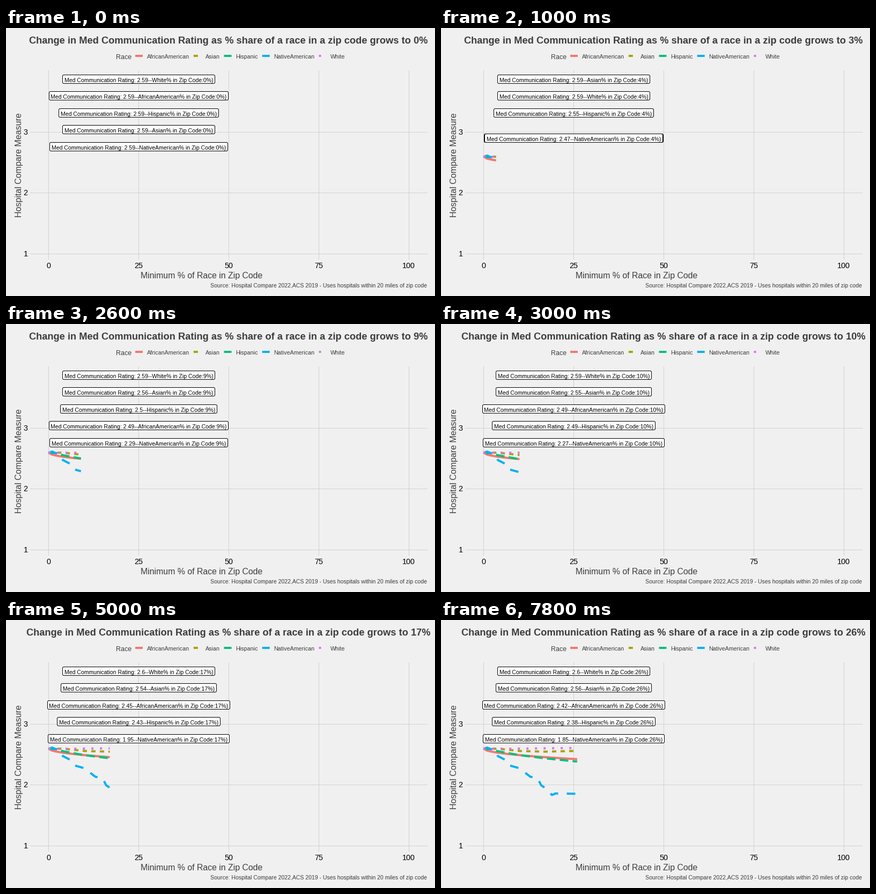
Animation of 800 by 500 pixels, one loop 8 s. Source, as a matplotlib script:

```python
import numpy as np
import matplotlib.pyplot as plt
from matplotlib.animation import FuncAnimation
from matplotlib.patches import FancyBboxPatch

W, H, DPI = 800, 500, 100
FRAMES, STEP_MS = 40, 200
FRAMES_PER_PCT = 1.49
MID_X = 247.5
BG, GRID, INK = "#F0F0F0", "#D2D2D2", "#3C3C3C"

plt.rcParams["font.family"] = "Liberation Sans"


def through(*points):
    """Curve of straight pieces through (percent, rating) points."""
    return lambda pct: np.interp(pct, *zip(*points))


def african_american(pct):
    return 2.5948 - 0.0344 * np.sqrt(pct)


asian = through((0, 2.591), (4, 2.592), (10, 2.554), (17, 2.543), (26, 2.556))
hispanic = through((0, 2.593), (2, 2.585), (4, 2.55), (10, 2.4855),
                   (17, 2.434), (26, 2.38))
native_american = through((0, 2.59), (1, 2.61), (3, 2.56), (4, 2.47), (6, 2.41),
                          (7, 2.32), (10, 2.27), (13, 2.13), (15, 2.11),
                          (16, 1.99), (17, 1.95), (19, 1.83), (20, 1.855),
                          (26, 1.85))
white = through((0, 2.5949), (4, 2.59), (12, 2.5945), (26, 2.604))

RACES = [
    ("AfricanAmerican", "#F8766D", "-", african_american),
    ("Asian", "#A3A500", (0, (2, 2)), asian),
    ("Hispanic", "#00BF7D", (0, (4, 2)), hispanic),
    ("NativeAmerican", "#00B0F6", (0, (4, 4)), native_american),
    ("White", "#E76BF3", (0, (1, 3)), white),
]

PCT = np.arange(27)
PCT_FRAME = np.round(PCT * FRAMES_PER_PCT)
RATING = np.array([rate(PCT) for *_, rate in RACES])
# rank of every race at every percent, 0 = highest rating
RANK = np.argsort(np.argsort(-RATING, axis=0), axis=0)

fig = plt.figure(figsize=(W / DPI, H / DPI), dpi=DPI, facecolor=BG)
renderer = fig.canvas.get_renderer()
ax = fig.add_axes([0, 0, 1, 1])
ax.set_xlim(0, W)
ax.set_ylim(H, 0)
ax.axis("off")


def px(pct):
    return 79.2 + 6.72 * pct


def py(rating):
    return 307.2 - 113.4 * (rating - 2)


def text(x, y, s, size, color=INK, ha="left", **kw):
    return ax.text(x, y, s, fontsize=size * 72 / DPI, color=color, ha=ha,
                   va="baseline", **kw)


def text_width(item):
    return item.get_window_extent(renderer).width


def stroke(color, style, xs=(), ys=()):
    return ax.plot(xs, ys, color=color, ls=style, lw=4 * 72 / DPI,
                   solid_capstyle="butt", dash_capstyle="butt", snap=False)[0]


def draw_axes():
    grid = dict(color=GRID, lw=72 / DPI, antialiased=False, zorder=0)
    for pct in range(0, 101, 25):
        ax.plot([px(pct)] * 2, [79, 431], **grid)
        text(px(pct), 448, str(pct), 14.4, "black", "center")
    for rating in (1, 2, 3):
        ax.plot([45, 785], [py(rating)] * 2, **grid)
        text(40.5, py(rating) + 5.3, str(rating), 14.4, "black", "right")

    text(364.8, 467, "Minimum % of Race in Zip Code", 15.9, ha="center")
    text(28.7, 255.5, "Hospital Compare Measure", 16, ha="center",
         rotation=90, rotation_mode="anchor")
    text(785, 484, "Source: Hospital Compare 2022,ACS 2019 - Uses hospitals "
         "within 20 miles of zip code", 10.53, ha="right")


def draw_legend():
    text(204.5, 58, "Race", 12.5)
    x = 241
    for name, color, style, _ in RACES:
        stroke(color, style, [x, x + 14], [52, 52])
        x += 21.7
        x += text_width(text(x, 57, name, 10.6)) + 8


class Label:
    """Rounded white box that hugs one line of centred text."""

    def __init__(self, z):
        self.text = text(MID_X, 0, "", 10.53, "black", "center", zorder=z + 0.5)
        self.box = FancyBboxPatch((0, 0), 1, 1, fc="white", ec="black",
                                  lw=72 / DPI, zorder=z,
                                  boxstyle="round,pad=0,rounding_size=2.4")
        ax.add_patch(self.box)

    def update(self, s, y):
        y = round(y)
        self.text.set_text(s)
        self.text.set_y(y + 5)
        half = round(text_width(self.text) / 2 + 3.2)
        self.box.set_bounds(MID_X - half, y - 8.5, 2 * half, 16)


draw_axes()
draw_legend()
title = text(414.8, 29, "", 18.24, ha="center", weight="bold")
curves = [stroke(color, style) for _, color, style, _ in RACES]
labels = [Label(10 + i) for i in range(len(RACES))]


def update(n):
    now = np.interp(n, PCT_FRAME, PCT)
    row = int(now + 0.5)
    xs = np.append(PCT[PCT < now], now)
    title.set_text("Change in Med Communication Rating as % share of a race "
                   f"in a zip code grows to {round(n / FRAMES_PER_PCT)}%")
    for i, (name, *_) in enumerate(RACES):
        curves[i].set_data(px(xs), py(np.interp(xs, PCT, RATING[i])))
        value = f"{round(RATING[i, row], 2):g}"
        slot = np.interp(now, PCT, RANK[i])
        labels[i].update(f"Med Communication Rating: {value}--{name}"
                         f"% in Zip Code:{row}%)", 96 + 31.4 * slot)
    return [title, *curves]


anim = FuncAnimation(fig, update, frames=FRAMES, interval=STEP_MS,
                     repeat=True, repeat_delay=0, blit=False)
plt.show()
```
